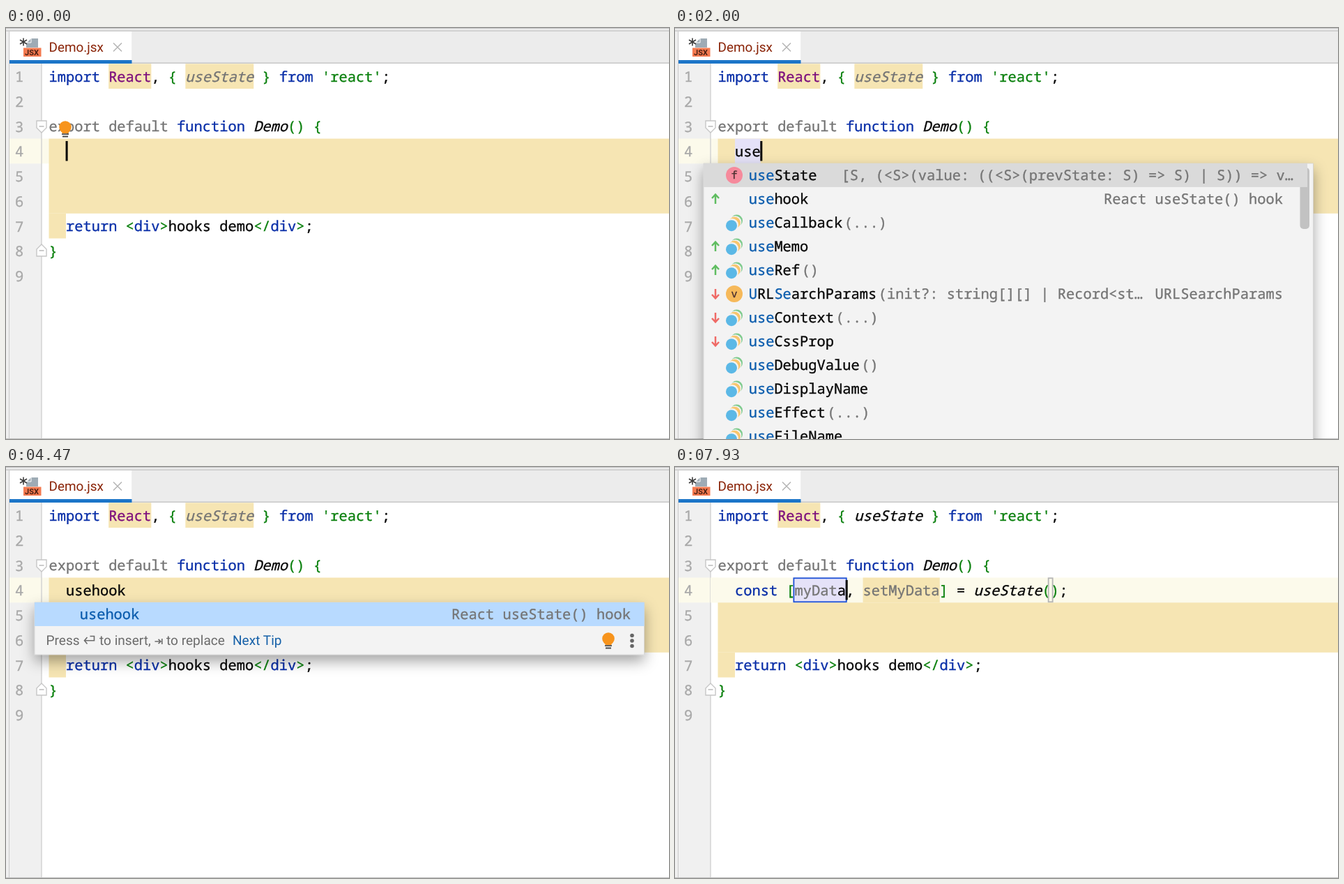
An HTML page that plays this animation: 951x589 px, repeating every 8000 ms.

```html
<!DOCTYPE html>
<html lang="en">
<head>
<meta charset="utf-8">
<title>Editor live template</title>
<style>
html, body { margin: 0; width: 100%; height: 100%; overflow: hidden; background: #fff; }
svg { display: block; width: 951px; height: 589px; }
text { white-space: pre; font: 20.4px "Noto Sans Mono", "DejaVu Sans Mono", monospace; color: #080808; text-rendering: geometricPrecision; }
text, tspan { fill: currentColor; stroke: currentColor; stroke-width: .35px; }
.ui { font: 19.1px Roboto, "Liberation Sans", sans-serif; color: #6c6c6c; stroke: none; }
.tab { font-size: 18.9px; color: #8a2408; }
.badge { font: bold 11px Roboto, sans-serif; color: #4a2013; stroke: none; }
.kw { color: #0a2fa8; }
.cls { color: #7d0f7d; }
.str, .br { color: #0b800e; }
.dim { color: #757575; }
.num { color: #a9a9a9; }
.hit { color: #0b5cad; }
.it { font-style: italic; }
.link { color: #1560a8; }
.letter { font-size: 15px; color: #4a3030; text-anchor: middle; }
.end { text-anchor: end; }
</style>
</head>
<body>
<svg id="stage" viewBox="0 0 951 589">
  <defs>
    <filter id="shadow" x="-10%" y="-60%" width="120%" height="240%">
      <feDropShadow dx="0" dy="9" stdDeviation="10" flood-color="#000" flood-opacity=".36"/>
    </filter>
  </defs>
  <g id="back"></g>
  <g id="code"></g>
  <g id="popup"></g>
</svg>
<script>
const LOOP = 8000, LEFT = 61.5, CELL = 12.24, TOP = 51.3, ROW = 35.75;
const WARN = '#f6e5b3', CURRENT = '#fcfaeb', LAVENDER = '#e5e2f8';
const BLINK = 400, ACCEPT = 4730, ANALYSED = 4930;
const LIST_OPEN = 1670, LIST_NARROW = 2150, BULB = 3930;

const typed = (word, times) => times.map((at, i) => ({ at, ch: word[i] }));
const abbreviation = typed('usehook', [1200, 1570, 1800, 2130, 2330, 2700, 3130]);
const variable = typed('myData', [6130, 6400, 6870, 7130, 7400, 7730]);
const strokes = [0, ...abbreviation.map(k => k.at), ACCEPT, ...variable.map(k => k.at)];

const proposals = [
  { name: 'useState', icon: 'f', gap: 35, tail: '[S, (<S>(value: ((<S>(prevState: S) => S) | S)) => v…' },
  { name: 'usehook', move: 1, right: 'React useState() hook' },
  { name: 'useCallback', icon: 'o', tail: '(...)' },
  { name: 'useMemo', icon: 'o', move: 1 },
  { name: 'useRef', icon: 'o', move: 1, tail: '()' },
  { name: 'URLSearchParams', icon: 'v', move: -1, tail: '(init?: string[][] | Record<st…', right: 'URLSearchParams' },
  { name: 'useContext', icon: 'o', move: -1, tail: '(...)' },
  { name: 'useCssProp', icon: 'o', move: -1 },
  { name: 'useDebugValue', icon: 'o', tail: '()' },
  { name: 'useDisplayName', icon: 'o' },
  { name: 'useEffect', icon: 'o', tail: '(...)' },
  { name: 'useFileName', icon: 'o' }
];

const colX = col => LEFT + col * CELL;
const rowY = row => TOP + (row - 1) * ROW;
const escapeText = s => s.replace(/&/g, '&amp;').replace(/</g, '&lt;');
const rect = (x, y, w, h, fill, more = '') =>
  `<rect x="${x}" y="${y}" width="${w}" height="${h}" fill="${fill}" ${more}/>`;
const circle = (x, y, r, fill) => `<circle cx="${x}" cy="${y}" r="${r}" fill="${fill}"/>`;
const path = (d, stroke, width = 1.5, fill = 'none') =>
  `<path d="${d}" stroke="${stroke}" stroke-width="${width}" fill="${fill}"/>`;
const label = (x, y, s, cls = '') => `<text x="${x}" y="${y}" class="${cls}">${escapeText(s)}</text>`;
const spans = (x, y, parts) => `<text x="${x}" y="${y}">` +
  parts.map(([s, cls = '']) => `<tspan class="${cls}">${escapeText(s)}</tspan>`).join('') + '</text>';
const line = (row, col, ...parts) => spans(colX(col), rowY(row) + 25.5, parts);
const mark = (row, col, count, fill) => rect(colX(col), rowY(row), count * CELL, ROW, fill);

function bulb(x, y) {
  return circle(x, y, 8.8, '#f7941d') + rect(x - 4.5, y + 5, 9, 4, '#f7941d') +
    path(`M${x - 5} ${y + 10.2}h10M${x - 4} ${y + 13.5}h8`, '#4a4a4a', 1.8);
}

function fold(y, dir) {
  return path(`M44 ${y - 8 * dir}h14v${10 * dir}l-7 ${7 * dir}l-7 ${-7 * dir}z`, '#c6c6c6', 1.4, '#fff') +
    path(`M47.5 ${y}h7`, '#b5b5b5', 1.4);
}

function drawBack() {
  const numbers = Array.from({ length: 9 }, (_, i) => label(13, rowY(i + 1) + 25.8, String(i + 1), 'num'));
  return rect(0, 0, 951, 589, '#fff') + rect(0, 0, 951, 50, '#ececec') +
    rect(0, 0, 951, 1, '#c4c4c4') + rect(0, 3.5, 951, 1.2, '#c2c2c2') +
    rect(0, 5, 5, 584, '#efefef') + rect(4, 5, 1.2, 584, '#c9c9c9') +
    rect(5, 51, 46, 538, '#f0f0f0') + rect(5, 49.5, 946, 1.5, '#c8c8c8') +
    rect(5.2, 5, 175, 41, '#fff') + rect(5, 46, 175.5, 5, '#1c75c8') +
    path('M29 22l7 -7h10v13h-17z', 'none', 0, '#9eabb5') + path('M29 21h7v-6', '#fff', 1) +
    path('M25 14.5v11M20 17l10 6M30 17l-10 6', '#3c3c3c', 1.6) +
    rect(25, 28.5, 25.5, 12.5, '#f47a50') + label(27, 39, 'JSX', 'badge') +
    label(61.5, 34, 'Demo.jsx', 'ui tab') +
    path('M154 21.5l12 12M166 21.5l-12 12', '#b5b5b5', 1.5) +
    rect(5, rowY(4), 57, ROW, CURRENT) + rect(50.3, 51, 1.4, 538, '#d0d0d0') +
    numbers.join('') + rect(0, 588, 951, 1, '#c0c0c0');
}

function templateLine(t, name, fresh) {
  const n = name.length, setter = 'set' + name.charAt(0).toUpperCase() + name.slice(1);
  const setCol = 11 + n, argX = colX(setCol + setter.length + 13);
  const boxX = colX(9) - (n ? 1.3 : 3), boxW = n * CELL + (n ? 2 : 6);
  const old = n - fresh;
  let out = '';
  if (t >= ANALYSED) out += mark(4, setCol, setter.length, WARN);
  out += rect(boxX, 159.3, boxW, 34, n ? LAVENDER : '#fff', 'stroke="#1c4fd6" stroke-width="1.8"');
  out += line(4, 2, ['const', 'kw'], [' '], ['[', 'br'], [name.slice(0, old), 'dim'], [name.slice(old)],
    [', '], [setter, 'dim'], [']', 'br'], [' = '], ['useState', 'it'], ['()', 'br'], [';']);
  return out + rect(argX - 3.2, 159.3, 6, 34, 'none', 'stroke="#b5b5b5" stroke-width="1.8"');
}

function drawCode(t) {
  const accepted = t >= ACCEPT, analysed = t >= ANALYSED;
  const keys = (accepted ? variable : abbreviation).filter(k => k.at <= t);
  const word = keys.map(k => k.ch).join('');
  const fresh = keys.filter(k => t - k.at < 300).length;
  const warnRow = analysed ? 5 : 4;
  let out = '';
  if (analysed) out += rect(51, rowY(4), 900, ROW, CURRENT);
  out += rect(LEFT, rowY(warnRow), 951 - LEFT, (7 - warnRow) * ROW, WARN) + mark(7, 0, 2, WARN);
  out += mark(1, 7, 5, WARN);
  if (!analysed) out += mark(1, 16, 8, WARN);
  out += line(1, 0, ['import ', 'kw'], ['React', 'cls'], [', '], ['{ ', 'br'],
    ['useState', analysed ? 'it' : 'it dim'], [' }', 'br'], [' from ', 'kw'], ["'react'", 'str'], [';']);
  out += fold(141, 1) + fold(319, -1);
  out += line(3, 0, ['export default ', 'dim'], ['function ', 'kw'], ['Demo', 'it'], ['() {', 'br']);
  out += line(7, 2, ['return ', 'kw'], ['<', 'br'], ['div', 'kw'], ['>', 'br'], ['hooks demo'],
    ['</', 'br'], ['div', 'kw'], ['>', 'br'], [';']);
  out += line(8, 0, ['}', 'br']);
  if (accepted) {
    out += templateLine(t, word, fresh);
  } else {
    if (word === 'use' && t > 1930) out += mark(4, 2, 3, LAVENDER);
    out += line(4, 2, [word]);
  }
  const lastStroke = Math.max(...strokes.filter(at => at <= t));
  if ((t - lastStroke) % (2 * BLINK) < BLINK) {
    const x = colX((accepted ? 9 : 2) + word.length);
    out += rect(x - (accepted && !word ? 2 : 0.4), 162, accepted && !word ? 4 : 3, 28.5, '#000');
  }
  if (!word && !accepted) out += bulb(85, 142);
  return out;
}

// Splits a name into runs, colouring the letters that match the query in order.
function matched(name, query) {
  if (name.startsWith(query)) return [[query, 'hit'], [name.slice(query.length)]];
  return [['U', 'hit'], ['RL'], [name.slice(3, 2 + query.length), 'hit'], [name.slice(2 + query.length)]];
}

function proposalIcon(kind, y) {
  if (kind === 'o') {
    return circle(88.5, y - 3, 8.5, '#7fcb8d') + circle(86.5, y - 1, 8.8, '#f3f3f3') +
      circle(85.5, y, 8.3, '#f8c56c') + circle(82, y + 3, 9, '#f3f3f3') + circle(81, y + 4.2, 8, '#5bb8e6');
  }
  return circle(85, y, 12, kind === 'f' ? '#f68a9c' : '#f6b95a') + label(85, y + 5, kind, 'letter');
}

function moveArrow(dir, y) {
  return path(`M58 ${y + 7 * dir}V${y - 6 * dir}M53 ${y - dir}L58 ${y - 6.5 * dir}L63 ${y - dir}`,
    dir > 0 ? '#5fbd60' : '#ef6a66', 2.5);
}

const panel = height => rect(41, 194, 874.5, height, '#f3f3f3',
  'stroke="#c6c6c6" stroke-width=".6" filter="url(#shadow)"');

function drawList(query) {
  const nameX = 105.7;
  const rows = proposals.map((p, i) => {
    const y = 211 + 34 * i, base = y + 7;
    const tailX = nameX + p.name.length * CELL + (p.gap || 2.5);
    return (p.move ? moveArrow(p.move, y) : '') + (p.icon ? proposalIcon(p.icon, y) : '') +
      spans(nameX, base, matched(p.name, query)) +
      (p.tail ? label(tailX, base, p.tail, 'dim') : '') +
      (p.right ? label(872, base, p.right, 'dim end') : '');
  });
  return panel(430) + rect(896.5, 200, 13.5, 88, '#c2c2c2', 'rx="5"') +
    rect(41, 194, 866, 34, '#dadada') + rows.join('');
}

function drawSingle(query, t) {
  const complete = query === 'usehook';
  return panel(75) + rect(41, 194, 874.5, 34, complete ? '#b8daff' : '#dadada') +
    spans(105.7, 218, matched('usehook', query)) + label(896, 218, 'React useState() hook', 'dim end') +
    label(57.5, 255, 'Press', 'ui') +
    path('M116.5 244l-4 4.7l4 4.7M113 248.7h13.5v-6.2h-6', '#6c6c6c', 1.6) +
    label(134, 255, 'to insert,', 'ui') +
    path('M213.5 250h8M218.5 246.8l3.5 3.2l-3.5 3.2M223.8 246v8', '#6c6c6c', 1.6) +
    label(230, 255, 'to replace', 'ui') + label(325, 255, 'Next Tip', 'ui link') +
    [241.5, 249, 256.5].map(y => circle(898, y, 2.8, '#666')).join('') +
    (t >= BULB ? bulb(864, 246) : '');
}

function drawPopup(t) {
  if (t < LIST_OPEN || t >= ACCEPT) return '';
  const query = abbreviation.filter(k => k.at <= t).map(k => k.ch).join('');
  return t < LIST_NARROW ? drawList(query.slice(0, 3)) : drawSingle(query, t);
}

const shown = {};
function show(id, markup) {
  if (shown[id] !== markup) document.getElementById(id).innerHTML = shown[id] = markup;
}

function render(t) {
  show('code', drawCode(t));
  show('popup', drawPopup(t));
}

show('back', drawBack());
const start = performance.now();
function tick() {
  render((performance.now() - start) % LOOP);
  requestAnimationFrame(tick);
}
tick();
</script>
</body>
</html>
```
